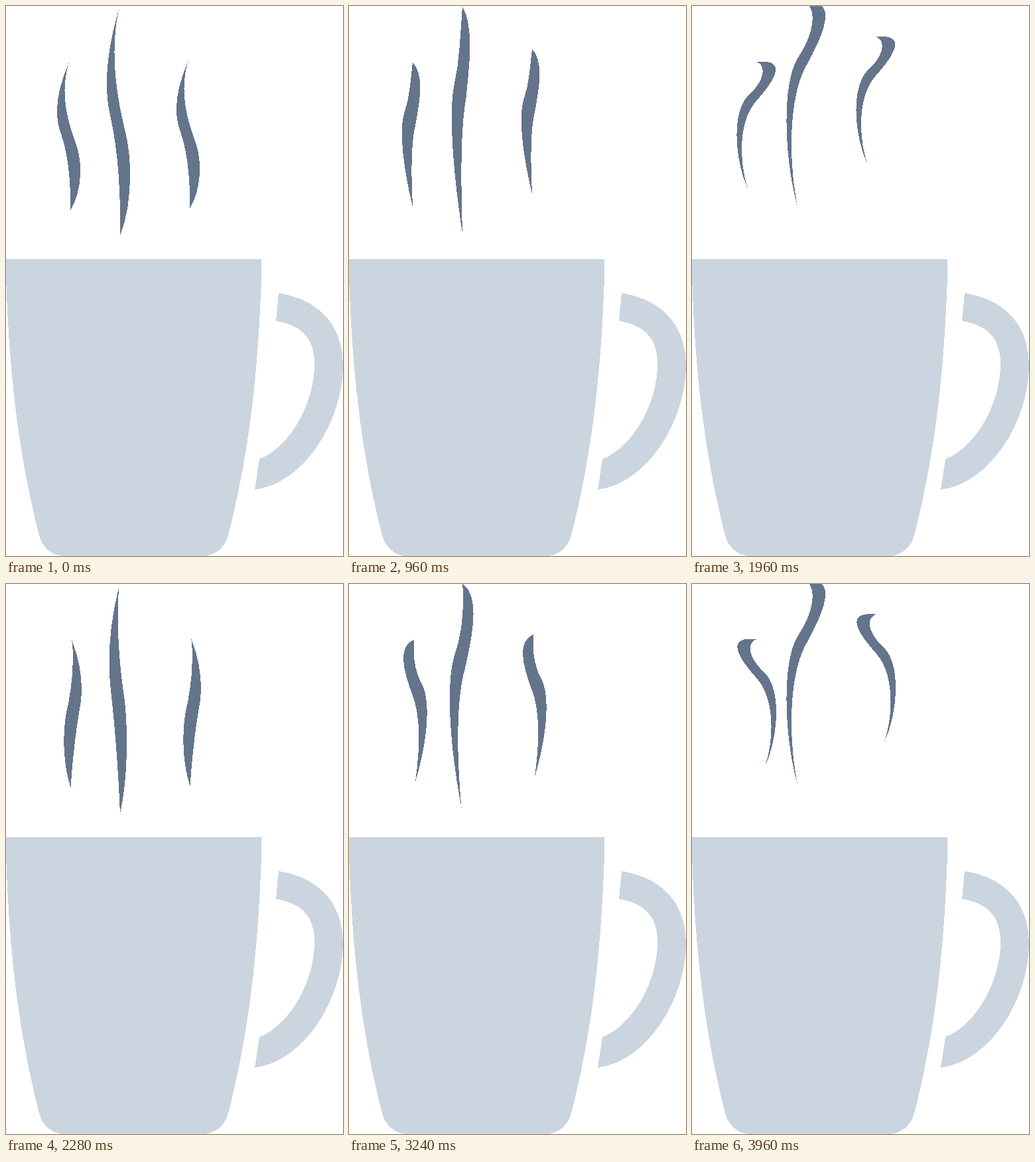
An HTML page that plays this animation: 508 px wide and 828 px high, repeating every 4000 ms.

```html
<!DOCTYPE html>
<html lang="en">
<head>
<meta charset="utf-8">
<title>Steaming mug</title>
<style>
  html, body { margin: 0; width: 100%; height: 100%; overflow: hidden; background: #fff; }
  svg { display: block; width: 100%; height: 100%; shape-rendering: crispEdges; }
  .mug { fill: #cbd5df; }
  .steam { fill: #64748b; }
</style>
</head>
<body>
<svg viewBox="0 0 508 828">
  <g class="mug">
    <path d="M0 381V410C5 560 20 680 50 797C55 815 69 828 88 828H297C315 828 330 815 335 797C365 680 380 560 385 410V381Z"/>
    <path d="M411 432C470 442 508 478 508 541C508 625 449 719 375 728L382 682C427 665 465 599 465 539C465 500 446 481 407 474Z"/>
  </g>
  <g class="steam">
    <path id="left"/>
    <path id="middle"/>
    <path id="right"/>
  </g>
</svg>
<script>
const CYCLE = 2000;
const mix = (a, b, k) => a + (b - a) * k;

// The wisp's outline as cubic points: tip, left waist, foot, right waist.
const calm = [[170, 5], [150, 75], [148, 125], [157, 165], [167, 208], [173, 265],
  [172, 346], [190, 300], [191, 235], [180, 190], [169, 145], [155, 75]];
const blown = [[172, -4], [187, 2], [188, 36], [158.5, 78], [133, 122], [140, 240],
  [158.5, 299], [146, 245], [142, 140], [172, 88], [192, 53], [228, -14]];
const FOOT = 6;

// Everything drifts evenly, except the foot, which lifts late.
const wispAt = u => calm.map(([x, y], i) => {
  const k = i === FOOT ? u ** 3.7 : u;
  return [mix(x, blown[i][0], k), mix(y, blown[i][1], k)];
});

function show(id, outline, place) {
  const [tip, ...rest] = outline.map(([x, y]) => place(x, y).map(v => v.toFixed(2)));
  document.getElementById(id).setAttribute("d", `M${tip}C${rest},${tip}Z`);
}

function draw(time) {
  const mirrored = time >= CYCLE;
  const u = (time % CYCLE) / CYCLE;
  const outline = wispAt(u);
  const tipY = outline[0][1];

  // The short wisps are squashed copies that flip over every other cycle.
  const squash = mix(0.654, 0.624, u);
  const top = (mirrored ? 84 : 85) - u;
  const sideX = x => mirrored ? 269.5 - x : x - 75;
  const sideY = y => top + (y - tipY) * squash;
  const lift = mirrored
    ? mix(2, 39, Math.max(0, (u - 0.55) / 0.45))
    : mix(3, 38.5, u);

  show("middle", outline, (x, y) => [x, y]);
  show("left", outline, (x, y) => [sideX(x), sideY(y)]);
  show("right", outline, (x, y) => [sideX(x) + 180, sideY(y) - lift]);
}

const start = performance.now();
function tick() {
  draw((performance.now() - start) % (2 * CYCLE));
  requestAnimationFrame(tick);
}
tick();
</script>
</body>
</html>
```
